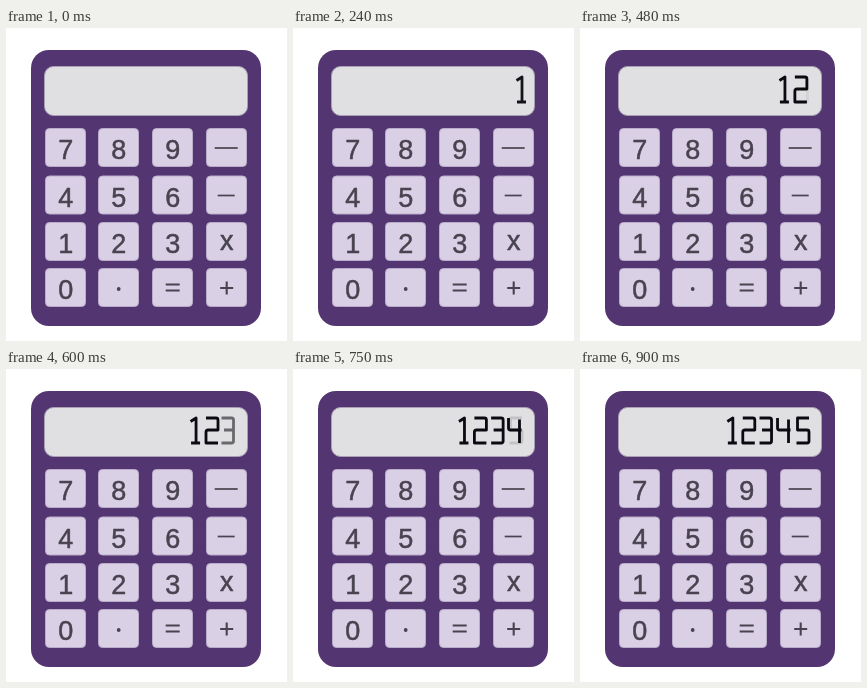
An HTML page with a canvas for the animation above (1.17 s loop, 281 px wide and 313 px high).

```html
<!DOCTYPE html>
<html lang="en">
<head>
<meta charset="utf-8">
<title>Calculator</title>
<style>
html, body { margin: 0; width: 100%; height: 100%; overflow: hidden; background: #fff; }
canvas { display: block; }
</style>
</head>
<body>
<canvas id="stage" width="281" height="313"></canvas>
<script>
const ctx = document.getElementById('stage').getContext('2d');
const LOOP = 1170, STEP = 30, END = 900;
const SPEED = 0.124; // px per ms, leftwards

// Each digit fades in at its home x, then slides left from `leave`.
const digits = [
  { path: 'M1.5 5 L7 1.5 V26.5 M2 26.5 H11', home: 222, fade: 20, span: 230, leave: 286 },
  { path: 'M1.5 1.5 H11.5 Q13.5 1.5 13.5 3.5 V13.5 H3.5 Q1.5 13.5 1.5 15.5 V26.5 H13.5', home: 214, fade: 285, span: 180, leave: 475 },
  { path: 'M1.5 1.5 H11.5 Q13.5 1.5 13.5 3.5 V24.5 Q13.5 26.5 11.5 26.5 H1.5 M4 13.5 H13.5', home: 214, fade: 465, span: 240, leave: 610 },
  { path: 'M1.5 1.5 V11.5 Q1.5 13.5 3.5 13.5 H14.5 M12.5 3 V26.5', home: 214, fade: 600, span: 120, leave: 755 },
  { path: 'M14 1.5 H2.5 V13.5 H12 Q14 13.5 14 15.5 V24.5 Q14 26.5 12 26.5 H1.5', home: 215, fade: 735, span: 110, leave: 900 }
].map(d => ({ ...d, path: new Path2D(d.path) }));

const keys = ['789—', '456–', '123x', '0·=+'];
const columns = [39, 92, 146, 200];
const rows = [100, 147.5, 194, 240];

// Line symbols, drawn around the centre of their key.
const signs = {
  '—': 'M-12 0 H11',
  '–': 'M-9 0 H8',
  '=': 'M-7 -3.5 H7 M-7 2.5 H7',
  '+': 'M-6.5 0 H6.5 M0 -6.5 V6.5'
};

function box(x, y, w, h, r, fill, edge) {
  ctx.beginPath();
  ctx.roundRect(x, y, w, h, r);
  ctx.fillStyle = fill;
  ctx.fill();
  if (edge) {
    ctx.strokeStyle = edge;
    ctx.lineWidth = 1;
    ctx.stroke();
  }
}

function label(ch, x, y) {
  ctx.fillStyle = ctx.strokeStyle = '#48434f';
  if (ch === '·') {
    ctx.beginPath();
    ctx.arc(x, y + 1, 1.9, 0, 7);
    ctx.fill();
  } else if (signs[ch]) {
    ctx.save();
    ctx.translate(x, y);
    ctx.lineWidth = ch === '—' || ch === '–' ? 1.7 : 2.1;
    ctx.stroke(new Path2D(signs[ch]));
    ctx.restore();
  } else {
    ctx.font = '27px "Liberation Sans", Arial, sans-serif';
    ctx.textAlign = 'center';
    ctx.lineWidth = 0.5;
    const base = ch === 'x' ? y + 8 : y + 11;
    ctx.fillText(ch, x, base);
    ctx.strokeText(ch, x, base);
  }
}

function drawBody() {
  ctx.fillStyle = '#fff';
  ctx.fillRect(0, 0, 281, 313);
  box(25, 22, 230, 276, 18, '#533572');
  box(38.5, 38.5, 203, 49, 9, '#e0e0e2', '#aaa0b4');
  rows.forEach((y, r) => columns.forEach((x, c) => {
    box(x + 0.5, y + 0.5, 40, 38, 4, '#d9d0e6', '#b9acca');
    label(keys[r][c], x + 20.7, y + 20);
  }));
}

function drawDigits(t) {
  ctx.strokeStyle = '#0b0a12';
  ctx.lineWidth = 2.8;
  ctx.lineJoin = 'round';
  for (const d of digits) {
    const alpha = Math.min(1, (t - d.fade) / d.span);
    if (t < STEP || alpha <= 0) continue;
    ctx.save();
    ctx.globalAlpha = alpha;
    ctx.translate(d.home - SPEED * Math.max(0, t - d.leave), 47.5);
    ctx.stroke(d.path);
    ctx.restore();
  }
}

const start = performance.now();
function frame() {
  const t = (performance.now() - start) % LOOP;
  drawBody();
  drawDigits(Math.min(END, Math.floor(t / STEP) * STEP));
  requestAnimationFrame(frame);
}
frame();
</script>
</body>
</html>
```
